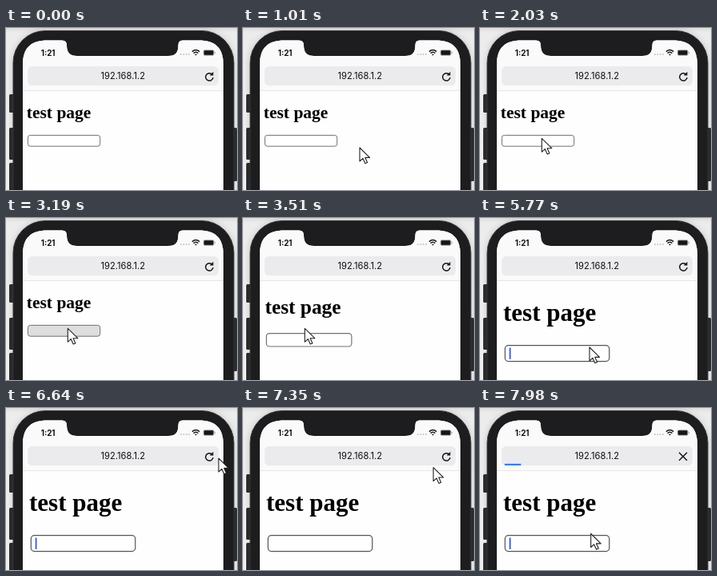
These frames come from a looping animation (289 by 203 pixels, 8000 ms). An HTML page:

```html
<!DOCTYPE html>
<html lang="en">
<head>
<meta charset="utf-8">
<title>test page</title>
<style>
  html, body { margin: 0; width: 100%; height: 100%; overflow: hidden; background: #ececed; }
  svg { display: block; width: 100vw; height: 100vh; }
  .ui { font-family: Inter, "Liberation Sans", sans-serif; fill: #111; }
  .heading { font: bold 21.5px "Liberation Serif", "Times New Roman", serif; fill: #000; }
  .icon { fill: none; stroke: #161616; stroke-width: 1.5; }
</style>
</head>
<body>
<svg viewBox="0 0 289 203" xmlns="http://www.w3.org/2000/svg">
  <defs>
    <linearGradient id="backdrop" x2="0" y2="1">
      <stop offset="0" stop-color="#dededf"/>
      <stop offset=".03" stop-color="#ececed"/>
      <stop offset="1" stop-color="#f1f1f2"/>
    </linearGradient>
    <filter id="soften" x="-10%" y="-10%" width="120%" height="120%">
      <feGaussianBlur stdDeviation="4"/>
    </filter>
    <clipPath id="screen">
      <path d="M21 210V46C21 25 31 15.5 52 15.5H70Q76 15.5 76 21.5C76 31 80 35 89 35H203C212 35 215.5 31 215.5 21.5Q215.5 15.5 221 15.5H241C262 15.5 272 25 272 46V210Z"/>
    </clipPath>
  </defs>
  <rect width="289" height="203" fill="url(#backdrop)"/>
  <rect x="9" y="4" width="276" height="260" rx="40" fill-opacity=".22" filter="url(#soften)"/>

  <g fill="#2b2b2d">
    <rect x="4" y="83" width="8" height="23" rx="1.5"/>
    <rect x="4" y="125" width="8" height="40" rx="1.5"/>
    <rect x="4" y="169" width="8" height="40" rx="1.5"/>
    <rect x="281" y="125" width="8" height="67" rx="1.5"/>
  </g>
  <rect x="9" y="3.5" width="276" height="260" rx="40" fill="#1d1d1f" stroke="#343436"/>

  <g clip-path="url(#screen)">
    <rect x="20" y="14" width="254" height="190" fill="#fefefe"/>
    <rect x="20" y="14" width="254" height="64" fill="#fafafa"/>
    <path d="M20 78.5H274" stroke="#e6e6e7"/>
    <text class="ui" x="43.7" y="34.6" font-size="9.8" font-weight="700">1:21</text>
    <g fill="#c4c4c6">
      <circle cx="219" cy="33" r="1"/><circle cx="222.3" cy="33" r="1"/>
      <circle cx="225.6" cy="33" r="1"/><circle cx="228.9" cy="33" r="1"/>
    </g>
    <g class="icon">
      <path d="M232.9 29.6Q237.5 25.4 242.1 29.6M234.6 31.6Q237.5 29 240.4 31.6"/>
      <path d="M236.2 33.2Q237.5 32 238.8 33.2L237.5 34.6Z" fill="#161616" stroke="none"/>
    </g>
    <rect x="246.8" y="27.3" width="13.6" height="7.4" rx="2" fill="#a5a5a7"/>
    <rect x="247.8" y="28.3" width="11.6" height="5.4" rx="1" fill="#161616"/>
    <path d="M261.3 29.7V32.3" stroke="#a5a5a7"/>

    <rect x="27" y="48" width="239" height="24" rx="5.5" fill="#ebebed"/>
    <text class="ui" x="146.3" y="64" font-size="11.2" text-anchor="middle">192.168.1.2</text>
    <g id="reload" class="icon">
      <path d="M259.1 62A4.7 4.7 0 1 1 257.4 57.7"/>
      <path d="M259.4 54.8V59.4H254.8Z" fill="#161616" stroke="none"/>
    </g>
    <path id="stop" class="icon" d="M249 55.8L259 65.8M259 55.8L249 65.8"/>
    <rect id="progress" x="30.8" y="69.8" width="20.5" height="2.2" fill="#2a83f7"/>

    <g id="page">
      <text class="heading" x="25.8" y="113.4">test page</text>
      <rect id="field" x="27.4" y="134.4" width="90.3" height="13.8" rx="3"/>
    </g>
    <rect id="caret" x="36.6" y="162.5" width="2" height="14.5" rx=".6" fill="#4565cf"/>
  </g>

  <circle id="touch" r="11.5" fill="#8c8c8c" fill-opacity=".35"/>
  <path id="pointer" d="M0 0V17L4 13.4L6.9 19.8L9.6 18.6L6.8 12.4H12.5Z"
        fill="#fff" stroke="#222" stroke-width="1.1" stroke-linejoin="round"/>
</svg>
<script>
const LOOP = 8000, START = 690, TICK = 78.4;
const el = id => document.getElementById(id);
const set = (id, attrs) => {
  for (const name in attrs) el(id).setAttribute(name, attrs[name]);
};
const show = (id, on) => set(id, { visibility: on ? "visible" : "hidden" });
const within = (k, from, to) => k >= from && k < to;

// Pointer stops: tick, x, y
const stops = [
  [0, 168, 192], [3, 140, 145], [5, 152, 155], [12, 152, 155],
  [17, 77.3, 138.3], [60, 77.3, 138.3], [65, 137, 162], [69, 195, 191],
  [71, 217, 184], [76, 266, 63], [81, 258, 58], [84, 258, 58], [90, 138.7, 157.5]
];

function pointerAt(k) {
  const next = stops.findIndex(s => s[0] > k);
  if (next < 0) return stops[stops.length - 1].slice(1);
  if (next === 0) return stops[0].slice(1);
  const [k0, x0, y0] = stops[next - 1], [k1, x1, y1] = stops[next];
  const u = (k - k0) / (k1 - k0);
  return [x0 + (x1 - x0) * u, y0 + (y1 - y0) * u];
}

function zoomAt(k) {
  if (k < 36) return "";
  return k < 39 ? "translate(-3 -13.9) scale(1.18)"
                : "translate(-8.3 -34.5) scale(1.445)";
}

function caretAlpha(k) {
  if (k < 39) return 0;
  if (k < 44) return 1;
  const phase = (k - 44) % 12.75;
  return phase < 2 ? 0.8 : phase < 6.4 ? 0 : 1;
}

function draw(time) {
  const k = Math.floor((time % LOOP - START) / TICK + 0.25);
  const [x, y] = pointerAt(k);
  show("pointer", k >= 0);
  set("pointer", { transform: `translate(${x} ${y})` });
  show("touch", within(k, 23, 25) || within(k, 81, 83));
  set("touch", { cx: x - 4, cy: y - 1 });

  set("page", { transform: zoomAt(k) });
  set("field", {
    fill: within(k, 32, 34) ? "#dedede" : "#fff",
    stroke: k < 39 ? "#707070" : "#555",
    "stroke-width": k < 39 ? 1 : 0.85
  });
  set("caret", { opacity: caretAlpha(k) });

  const loading = k >= 93;
  show("reload", !loading);
  show("stop", loading);
  show("progress", loading);
}

const begin = performance.now();
function tick() {
  draw(performance.now() - begin);
  requestAnimationFrame(tick);
}
tick();
</script>
</body>
</html>
```
